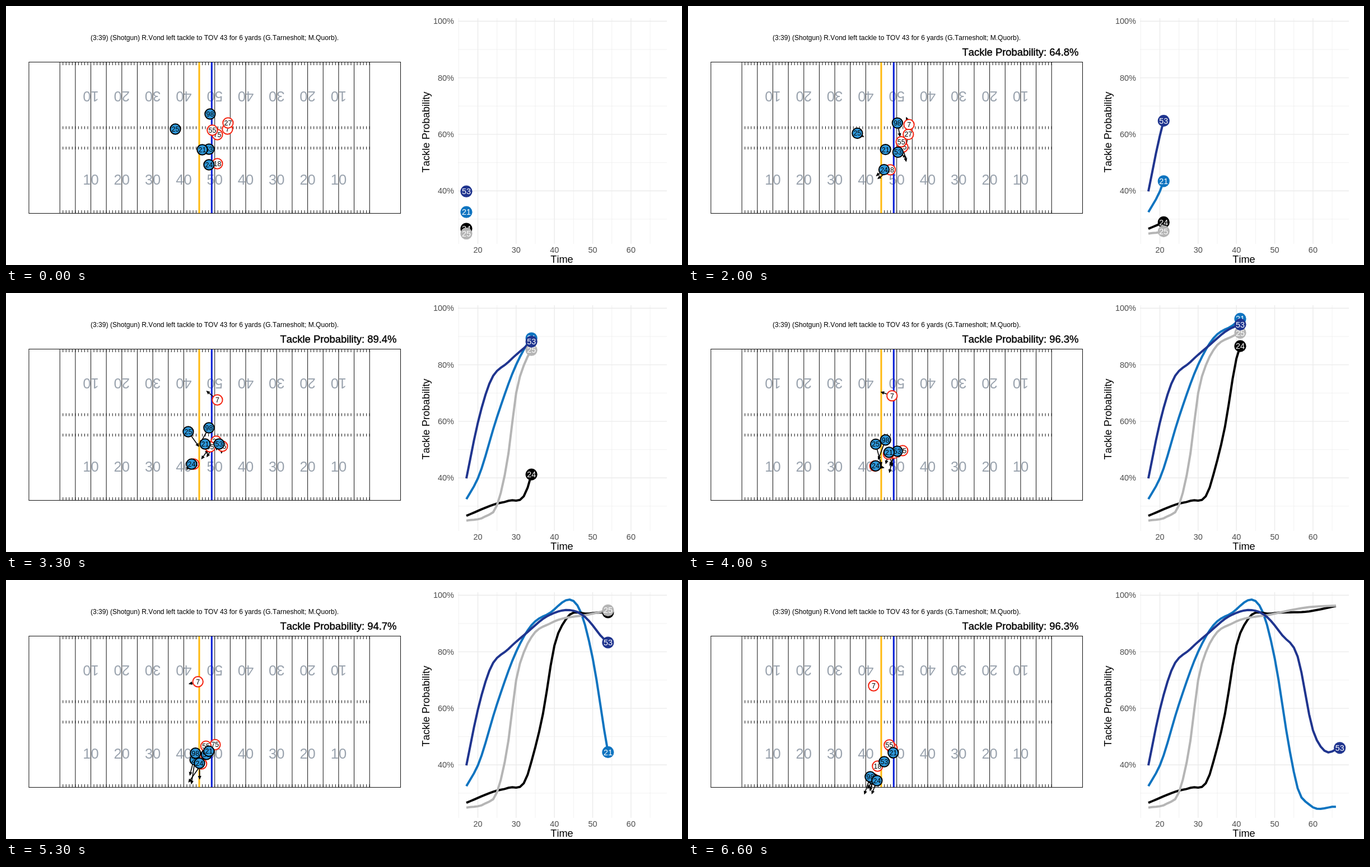
Write an HTML page that moves like this. It is 1207 px wide and 464 px high and loops after 6.7 s.

```html
<!DOCTYPE html>
<html lang="en">
<head>
<meta charset="utf-8">
<title>Tackle probability</title>
<style>
  html, body { margin: 0; width: 100%; height: 100%; overflow: hidden; background: #fff; }
  svg { display: block; font-family: "Liberation Sans", Arial, sans-serif; font-kerning: none; }
</style>
</head>
<body>
<svg width="1207" height="464" viewBox="0 0 1207 464" text-anchor="middle">
  <g id="base"></g>
  <g id="live"></g>
</svg>
<script>
const STEP = 100, STEPS = 67, FIRST = 17, LAST = 66;

// Key points [time, percent] of each curve, in drawing order
const curves = [
  { id: 21, color: '#0f74c0', end: 66, keys: [[17, 32.5], [20, 39.8], [25, 61.5], [30, 80], [34, 89.4], [38, 93.1],
    [48, 89.5], [50, 77.7], [54, 44.5], [56, 31.7], [59, 26], [66, 25.2]] },
  { id: 24, color: '#000', end: 66, keys: [[17, 26.6], [25, 30.9], [28, 31.9], [33, 36.5], [34, 41.2], [37, 58],
    [40, 82.2], [43, 91.5], [49, 93.5], [59, 94.3], [66, 96.2]] },
  { id: 25, color: '#b5b5b5', end: 66, keys: [[17, 24.9], [22, 26.4], [25, 30.3], [28, 48.7], [30, 70], [32, 79.8],
    [34, 85.2], [39, 90.1], [49, 93.2], [59, 95.8], [66, 96.3]] },
  { id: 53, color: '#20358f', end: 67, keys: [[17, 39.8], [20, 59.5], [23, 73.3], [28, 81], [33, 87], [38, 92.5],
    [48, 92.3], [52, 85.8], [56, 78.3], [60, 52.2], [63, 45], [67, 46]] }
];

// Each player's position at the key steps, in drawing order
const keySteps = [0, 12, 27, 33, 48, 58, 66];
const RED = { fill: '#fff', edge: '#f5220f' }, BLUE = { fill: '#2f99dc', edge: '#000' };
const players = [
  { id: 7, team: RED, path: [[395, 220], [396, 219], [388, 202], [377, 191], [350, 181], [336, 184], [331, 189]] },
  { id: 18, team: RED, path: [[377, 282], [374, 283], [346, 302], [335, 306], [338, 315], [342, 328], [338, 333]] },
  { id: 75, team: RED, path: [[377, 230], [379, 236], [386, 267], [386, 274], [377, 290], [369, 298], [364, 301]] },
  { id: 27, team: RED, path: [[396, 209], [396, 211], [386, 250], [375, 265], [359, 313], [339, 343], [331, 356]] },
  { id: 55, team: RED, path: [[368, 222], [379, 226], [375, 261], [364, 275], [356, 297], [358, 296], [359, 295]] },
  { id: 25, team: BLUE, path: [[302, 220], [297, 224], [312, 235], [325, 248], [339, 301], [334, 340], [330, 356]] },
  { id: 53, team: BLUE, path: [[362, 256], [365, 256], [381, 267], [380, 270], [363, 302], [353, 320], [350, 325]] },
  { id: 98, team: BLUE, path: [[364, 193], [369, 195], [372, 226], [362, 241], [343, 291], [333, 328], [325, 352]] },
  { id: 21, team: BLUE, path: [[350, 257], [352, 256], [353, 261], [355, 270], [362, 301], [362, 309], [366, 309]] },
  { id: 24, team: BLUE, path: [[362, 284], [358, 286], [340, 300], [331, 306], [344, 316], [344, 341], [337, 359]] }
];

const line = (x1, y1, x2, y2, color, w) =>
  `<path d="M${x1} ${y1}L${x2} ${y2}" stroke="${color}" stroke-width="${w}"/>`;
const text = (s, x, y, size, fill = '#000', extra = '') =>
  `<text x="${x}" y="${y}" font-size="${size}" fill="${fill}" ${extra}>${s}</text>`;
const disc = (x, y, r, fill, extra = '') =>
  `<circle cx="${x}" cy="${y}" r="${r}" fill="${fill}" ${extra}/>`;

const timeX = t => 842.5 + 6.835 * (t - 20);
const pctY = p => 27.3 + 5.065 * (100 - p);
const yardX = k => 96.2 + 5.53 * k;

// Smooth curve through (ts, vs): value and rate of change at t
function spline(ts, vs, t) {
  const last = ts.length - 1;
  const secant = i => (vs[i + 1] - vs[i]) / (ts[i + 1] - ts[i]);
  const slope = i => {
    if (i == 0) return secant(0);
    if (i == last) return secant(last - 1);
    const before = ts[i] - ts[i - 1], after = ts[i + 1] - ts[i];
    return (secant(i - 1) * after + secant(i) * before) / (before + after);
  };
  let i = 0;
  while (i < last - 1 && t >= ts[i + 1]) i++;
  const h = ts[i + 1] - ts[i], u = (t - ts[i]) / h, w = 1 - u, m = slope(i), n = slope(i + 1);
  return {
    value: vs[i] * (1 + 2 * u) * w * w + vs[i + 1] * u * u * (3 - 2 * u) + h * u * w * (m * w - n * u),
    rate: 6 * u * w * secant(i) + m * w * (1 - 3 * u) + n * u * (3 * u - 2)
  };
}

const percent = (c, t) => spline(c.keys.map(k => k[0]), c.keys.map(k => k[1]), t).value;

function drawField() {
  let s = text('(3:39) (Shotgun) R.Vond left tackle to TOV 43 for 6 yards (G.Tarnesholt; M.Quorb).', 372.5, 60.5, 12.08);
  for (let k = 0; k <= 100; k++) {
    const x = yardX(k);
    if (k % 5 == 0) s += line(x, 100.5, x, 371.5, '#111', 1);
    if (k) for (const y of [101, 215.5, 252, 366]) s += line(x, y, x, y + 5, '#111', 1);
  }
  for (let k = 10; k <= 90; k += 10) {
    const x = yardX(k), n = Math.min(k, 100 - k);
    s += text(n, x, 320, 25.5, '#9aa3ae');
    s += text(n, x, 153, 25.5, '#9aa3ae', `transform="rotate(180 ${x} 153)"`);
  }
  s += line(345, 100.5, 345, 371.5, '#ffb90f', 3) + line(367.3, 100.5, 367.3, 371.5, '#0a1fd8', 3);
  return s + '<rect x="40.9" y="100.5" width="663.6" height="271" fill="none" stroke="#111"/>';
}

function drawAxes() {
  let s = '';
  for (let p = 30; p <= 100; p += 10) {
    const y = pctY(p), major = p % 20 == 0;
    s += line(807, y, 1180, y, '#ebebeb', major ? 1.4 : 0.7);
    if (major) s += text(p + '%', 800, y + 5, 14.5, '#4d4d4d', 'text-anchor="end"');
  }
  for (let t = 15; t <= 65; t += 5) {
    const x = timeX(t), major = t % 10 == 0;
    s += line(x, 22, x, 426, '#ebebeb', major ? 1.4 : 0.7);
    if (major) s += text(t, x, 441.5, 14.5, '#4d4d4d');
  }
  return s + text('Time', 992.5, 460, 18.2) +
    text('Tackle Probability', 756, 226, 18.4, '#000', 'transform="rotate(-90 756 226)"');
}

// The arrow shows the distance covered in the next second at the present speed
function arrow({ x, y, dx, dy }) {
  const turn = Math.atan2(dy, dx) * 180 / Math.PI;
  return line(x, y, x + dx, y + dy, '#000', 1.6) +
    `<path d="M1 0L-4 -2.3V2.3Z" stroke="#000" transform="translate(${x + dx} ${y + dy}) rotate(${turn})"/>`;
}

function drawPlayers(n) {
  const poses = players.map(({ id, team, path }) => {
    const [px, py] = [0, 1].map(axis => spline(keySteps, path.map(p => p[axis]), n));
    return { id, team, x: px.value + 0.4, y: py.value + 0.5, dx: px.rate * 10, dy: py.rate * 10 };
  });
  return poses.map(arrow).join('') + poses.map(({ id, team, x, y }) =>
    disc(x, y, 9.2, team.fill, `stroke="${team.edge}" stroke-width="2"`) + text(id, x, y + 4.4, 12.4)).join('');
}

function drawCurves(n) {
  const now = Math.max(FIRST, n + 1), end = Math.min(now, LAST);
  let s = '';
  for (const c of curves) {
    let points = '';
    for (let t = FIRST; t <= end; t++) points += `${timeX(t)},${pctY(percent(c, t))} `;
    if (end > FIRST) s += `<polyline points="${points}" fill="none" stroke="${c.color}" stroke-width="4"/>`;
  }
  for (const c of curves) if (now <= c.end) {
    const x = timeX(now), y = pctY(percent(c, now));
    s += disc(x, y, 10.6, c.color) + text(c.id, x, y + 5.2, 14.4, '#fff');
  }
  if (n + 1 >= FIRST) {
    const best = Math.max(...curves.map(c => percent(c, end)));
    s += text(`Tackle Probability: ${Math.round(best * 10) / 10}%`, 593.5, 89.3, 18.45, '#000', 'stroke="#000" stroke-width=".4"');
  }
  return s;
}

const base = document.getElementById('base'), live = document.getElementById('live');
base.innerHTML = drawField() + drawAxes();
let shown = -1;
function tick() {
  const n = Math.floor(performance.now() / STEP) % STEPS;
  if (n != shown) live.innerHTML = drawPlayers(n) + drawCurves(n);
  shown = n;
  requestAnimationFrame(tick);
}
tick();
</script>
</body>
</html>
```
